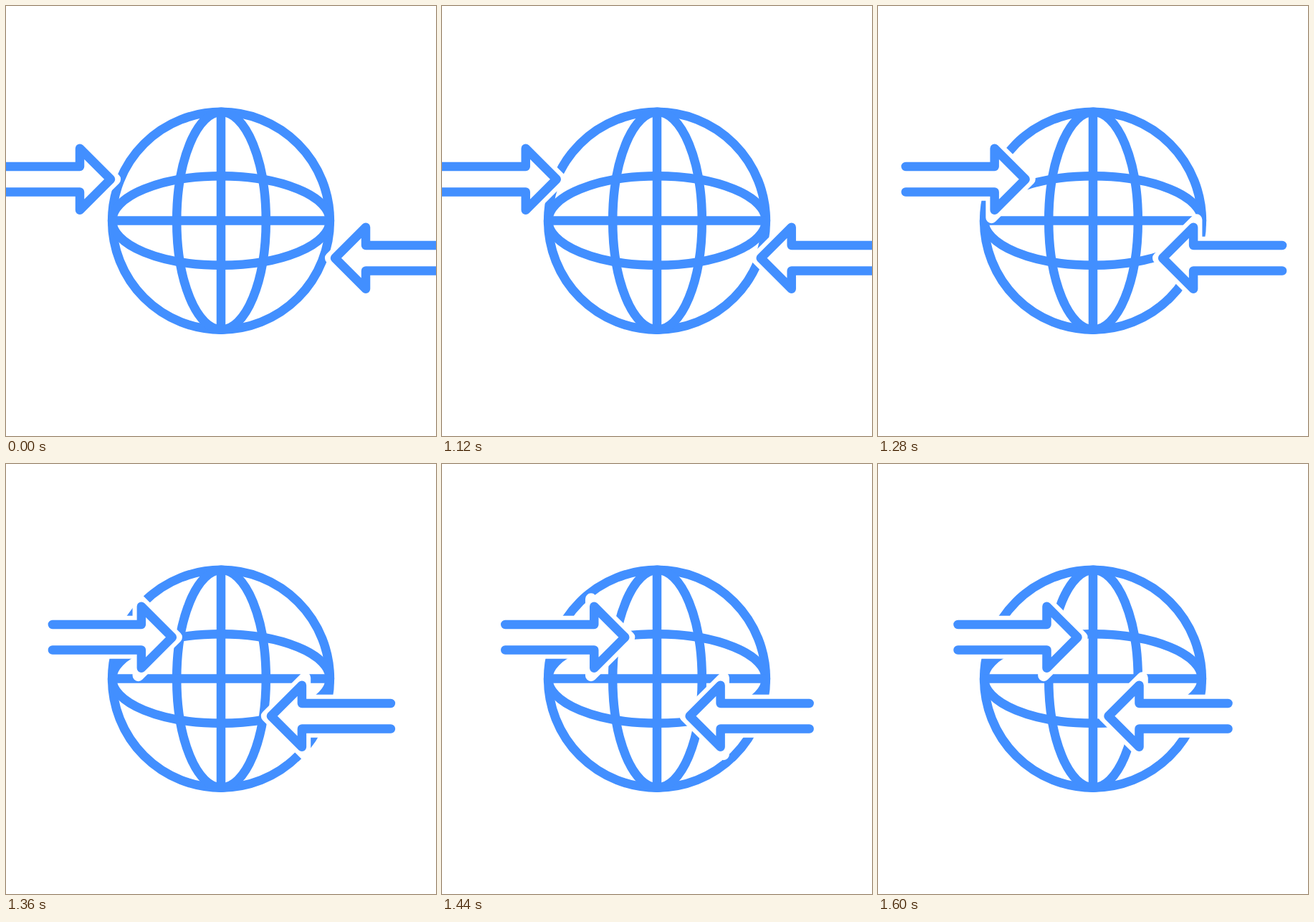
These frames come from a looping animation (600x600 px, 2000 ms). An HTML page:

```html
<!DOCTYPE html>
<html lang="en">
<head>
<meta charset="utf-8">
<title>Globe with arrows</title>
<style>
  html, body { margin: 0; width: 100%; height: 100%; overflow: hidden; background: #fff; }
  svg { display: block; width: 100%; height: 100%; }
  .line { fill: none; stroke: #428fff; stroke-width: 12.5; stroke-linecap: round; stroke-linejoin: round; }
  .globe { stroke-linecap: butt; }
  .halo { fill: #fff; stroke: #fff; stroke-width: 16; stroke-linejoin: round; }
</style>
</head>
<body>
<svg viewBox="0 0 600 600">
  <defs>
    <!-- Points right; the origin is the middle of the back of the head. -->
    <g id="arrow">
      <path class="halo" d="M-124-22H-4.3V-53.4L49.1 0L-4.3 53.4V22H-124Z"/>
      <path class="line" d="M-124-17.75H0V-43L43 0L0 43V17.75H-124"/>
    </g>
  </defs>
  <g class="line globe">
    <circle cx="300" cy="299.75" r="151.9"/>
    <ellipse cx="300.5" cy="299.75" rx="62.3" ry="151.9"/>
    <ellipse cx="300" cy="299.5" rx="151.9" ry="62.3"/>
    <path d="M148 299.5H452M300 148V452"/>
  </g>
  <use id="left" href="#arrow"/>
  <use id="right" href="#arrow"/>
</svg>
<script>
  const LOOP = 2000, STEP = 40, START = 1000, TRAVEL = 600;
  const left = document.getElementById('left');
  const right = document.getElementById('right');
  const mix = (from, to, k) => from + (to - from) * k;
  const ease = p => p * p * (3 - 2 * p);

  function draw(time) {
    const t = Math.floor((time % LOOP) / STEP) * STEP;
    const k = ease(Math.min(1, Math.max(0, (t - START) / TRAVEL)));
    left.setAttribute('transform', `translate(${mix(103, 235.5, k)} 241.75)`);
    right.setAttribute('transform', `translate(${mix(502, 364.5, k)} 351.75) rotate(180)`);
  }

  const origin = performance.now();
  function tick() {
    draw(performance.now() - origin);
    requestAnimationFrame(tick);
  }
  tick();
</script>
</body>
</html>
```
